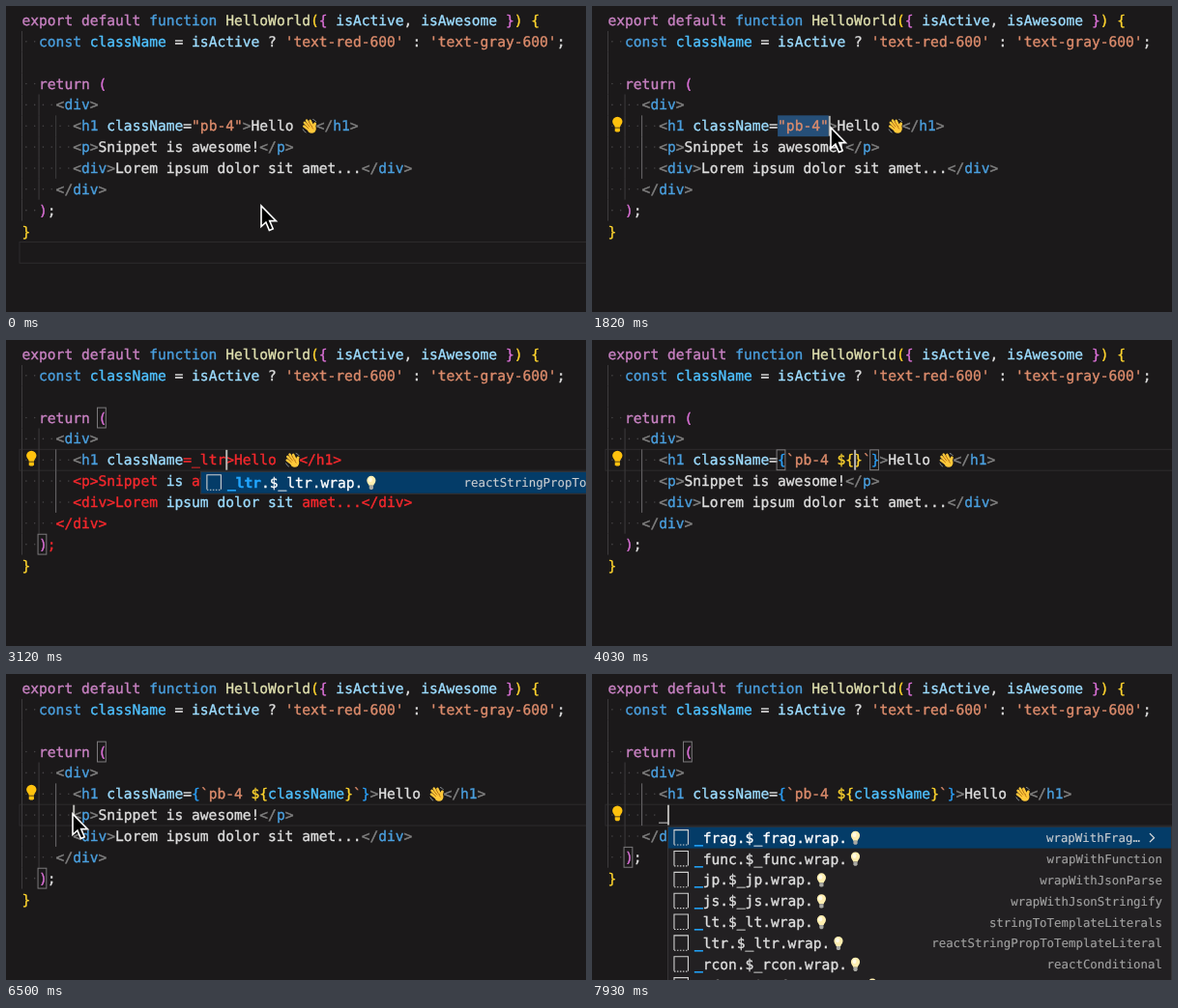
Recreate the animation shown at these times as an HTML page. Size 600 by 317 pixels, loop 8000 ms.

```html
<!DOCTYPE html>
<html lang="en">
<head>
<meta charset="utf-8">
<title>Editor snippets</title>
<style>
html, body { margin: 0; width: 100%; height: 100%; overflow: hidden; background: #1b191a; }
svg { display: block; width: 100vw; height: 100vh; }
text {
  font: 14.58px "DejaVu Sans Mono", "Liberation Mono", monospace;
  text-rendering: geometricPrecision;
  color: #dedede;
  fill: currentColor;
  stroke: currentColor;
  stroke-width: .35px;
}
.m { color: #c982c3 } .b { color: #4a9fde } .y { color: #dfdfae } .v { color: #9cdcfe }
.c { color: #4fc1ff } .s { color: #dd8c6c } .d { color: #808080 } .r { color: #f5282d }
.g { color: #ffd52e } .p { color: #da70d6 } .B { color: #2a9df4 }
.hit { color: #22a6ff; font-weight: bold }
.note { font-size: 12.4px; color: #a0a0a0; text-anchor: end; stroke-width: .15px }
.on { color: #fff }
.note.on { color: #c8ccd0 }
</style>
</head>
<body>
<svg id="stage" viewBox="0 0 600 317">
  <defs>
    <g id="wave" fill="none" stroke-linecap="round">
      <path d="M8 13L3 9.2M9 11L3.6 5.6M10.2 10L5.8 3.4M12.2 9.5L9.4 3.6" stroke="#ffc83a" stroke-width="2.5"/>
      <path d="M13 12L14.4 6.6" stroke="#ffc83a" stroke-width="2.8"/>
      <ellipse cx="11" cy="11.8" rx="4.6" ry="4.8" fill="#ffc83a"/>
      <path d="M7.6 11.4L5 9M8.8 9.8L6 6.3M10.6 9L8.2 5M12.4 12Q10.8 10.6 11.2 9.2" stroke="#b06c14" stroke-width=".9"/>
      <path d="M12.4 2.2Q14.4 2.8 15.4 4.4M2 12.6Q2.8 14.8 4.8 15.8" stroke="#8d9499" stroke-width=".9"/>
    </g>
    <g id="idea">
      <path d="M-2.4 3C-2.4 1.4-4.6.4-4.6-2.4A4.6 4.6 0 0 1 4.6-2.4C4.6.4 2.4 1.4 2.4 3Z" fill="#ffeeb0"/>
      <ellipse cx="-1" cy="-3" rx="2" ry="2.4" fill="#fffbe6"/>
      <path d="M-2.1 3H2.1V6L1 7.2H-1L-2.1 6Z" fill="#a9a9a4"/>
    </g>
    <g id="bulb" fill="#ffc20e">
      <path d="M-2.6 3.4C-2.6 1.8-5.2.2-5.2-2.4A5.2 5.2 0 0 1 5.2-2.4C5.2.2 2.6 1.8 2.6 3.4Z"/>
      <path d="M-2.6 4.2H2.6V7L1.4 8.2H-1.4L-2.6 7Z"/>
    </g>
    <g id="snip" fill="none" stroke="#d0d0d0" stroke-width="1.1">
      <path d="M0 15V0H14.5V15"/>
      <path d="M0 15.4H15" stroke-dasharray="1.5 1.5"/>
    </g>
    <g id="var" fill="none" stroke="#75beff" stroke-width="1.3">
      <path d="M2 2.5H-1.5V13.5H2M12 2.5H15.5V13.5H12"/>
      <path d="M3 7.2L8.6 4.8 11.4 6.6V9.4L6 11.4 3 9.8ZM3 7.2L6 8.8 11.4 6.6M6 8.8V11.4"/>
    </g>
  </defs>
  <g id="scene"></g>
  <path id="mouse" d="M0 0V21.5L4.9 17 8.4 25.4 12.2 23.8 8.7 15.6H15.4Z" fill="#000" stroke="#fff" stroke-width="1.6"/>
</svg>
<script>
const LOOP = 8000, STEP = 130;
const LEFT = 16.5, CHAR = 8.78, MID = 15, ROW = 21.85;
const EMOJI_COLS = 1.65;
const colX = c => LEFT + c * CHAR;
const rowY = r => MID + r * ROW;

const notes = {
  _frag: 'wrapWithFragment', _func: 'wrapWithFunction', _jp: 'wrapWithJsonParse',
  _js: 'wrapWithJsonStringify', _lt: 'stringToTemplateLiterals',
  _ltr: 'reactStringPropToTemplateLiteral', _rcon: 'reactConditional', _rfrag: 'reactFragment'
};
const snippets = Object.keys(notes).map(k => ({ label: `${k}.$${k}.wrap.`, note: notes[k] }));
const plain = names => names.split(' ').map(label => ({ label }));
const attrItems = [...plain('__dirname __filename'), ...snippets];
const nameItems = plain('className clearInterval clearTimeout close closed caches cancelIdleCallback captureEvents confirm');

const outer = last => [[3, 9, 1], [last, 2, 1]];
const literal = name => '¦B{¦s`pb-4 ¦g${¦c' + name + '¦g}¦s`¦B}';
const attr = typed => ({ value: typed, broken: true, caret: 20 + typed.length, menu: { col: 21, items: attrItems, typed } });
const expr = typed => ({
  value: literal(typed), caret: 29 + typed.length,
  marks: [[5, 20, 1], [5, 31 + typed.length, 1]], menu: { col: 30, items: nameItems, typed }
});

// Each beat changes part of the editor state from its time on.
const beats = [
  [0, { row: 11, caret: 0, value: '¦s"pb-4"', marks: [] }],
  [910, { row: 5, caret: 20, marks: outer(9) }],
  [1300, { from: [5, 20], marks: [], bulb: 5 }],
  [1950, { from: null, value: '', marks: outer(9) }],
  [2080, attr('_')],
  [2600, attr('_l')],
  [2860, attr('_lt')],
  [3120, attr('_ltr')],
  [3510, { ...expr(''), broken: false, menu: null }],
  [4290, expr('c')],
  [4420, expr('cl')],
  [4550, expr('cla')],
  [4680, { ...expr('className'), menu: null, caret: 39, marks: [[5, 27, 2], [5, 38, 1]] }],
  [6240, { row: 6, caret: 6, marks: outer(9) }],
  [6760, { from: [6, 6], marks: [] }],
  [7020, { bulb: 7 }],
  [7410, { from: null, cut: true, typed: '', bulb: 6, marks: outer(8) }],
  [7670, { typed: '_', caret: 7, menu: { col: 7, items: snippets, typed: '_' } }]
];

const moves = [
  [0, 264, 207], [780, 201, 126], [1170, 201, 126], [1690, 247, 126],
  [5590, 247, 126], [6240, 69, 145], [6630, 69, 145], [7150, 422, 170], [7280, 430, 198], [8000, 430, 198]
];

function pointer(t) {
  const i = moves.findIndex(m => m[0] > t);
  const [t0, x0, y0] = moves[i - 1], [t1, x1, y1] = moves[i];
  const k = (t - t0) / (t1 - t0), e = k * k * (3 - 2 * k);
  return { x: x0 + (x1 - x0) * e, y: y0 + (y1 - y0) * e, shown: t < 1950 || (t >= 5590 && t < 7410) };
}

function stateAt(t) {
  const past = beats.filter(b => b[0] <= t);
  return Object.assign({ since: past[past.length - 1][0] }, ...past.map(b => b[1]));
}

function codeLines(s) {
  const tag = n => `¦d<¦b${n}¦d>`, end = n => `¦d</¦b${n}¦d>`;
  const h1 = 'w      ¦d<¦bh1 ¦vclassName';
  const head = [
    'mexport default ¦bfunction ¦yHelloWorld¦g(¦p{ ¦visActive¦w, ¦visAwesome ¦p}¦g) {',
    "w  ¦bconst ¦cclassName ¦w= ¦visActive ¦w? ¦s'text-red-600' ¦w: ¦s'text-gray-600'¦w;",
    'w', 'w  ¦mreturn ¦p(', 'w    ' + tag('div')
  ];
  if (s.broken) return [...head,
    `${h1}¦r=${s.value}>Hello ¦E  ¦r</h1>`,
    'w      ¦r<p>Snippet ¦vis ¦rawesome!</p>',
    'w      ¦r<div>Lorem ¦vipsum dolor sit ¦ramet...</div>',
    'w    ¦r</div>', 'w  ¦p)¦r;', 'g}'];
  const body = s.cut ? ['w      ' + s.typed] : [
    'w      ' + tag('p') + '¦wSnippet is awesome!' + end('p'),
    'w      ' + tag('div') + '¦wLorem ipsum dolor sit amet...' + end('div')
  ];
  return [...head, `${h1}¦w=${s.value}¦d>¦wHello ¦E  ` + end('h1'), ...body, 'w    ' + end('div'), 'w  ¦p)¦w;', 'g}'];
}

const esc = s => s.replace(/&/g, '&amp;').replace(/</g, '&lt;').replace(/>/g, '&gt;');
const text = (x, y, s, cls) => `<text class="${cls}" x="${x}" y="${y + 5}">${esc(s)}</text>`;
const rect = (x, y, w, h, style) => `<rect x="${x}" y="${y}" width="${w}" height="${h}" ${style}/>`;
const use = (id, x, y) => `<use href="#${id}" x="${x}" y="${y}"/>`;
const lineText = line => line.split('¦').map(p => p.slice(1)).join('');

function drawLine(line, r) {
  let col = 0, out = '';
  const y = rowY(r), indent = lineText(line).search(/\S|$/);
  for (let c = 0; c < indent; c++) out += `<circle cx="${colX(c + .5)}" cy="${y}" r=".8" fill="#464446"/>`;
  for (const part of line.split('¦')) {
    const s = part.slice(1), word = s.trim(), emoji = part[0] === 'E';
    if (emoji) out += use('wave', colX(col) - 1, y - 9);
    else if (word) out += text(colX(col + s.search(/\S/)), y, word, part[0]);
    col += emoji ? EMOJI_COLS : s.length;
  }
  return out;
}

function drawGuides(lines, s) {
  return lines.map((line, r) => {
    const indent = line === 'w' ? 2 : lineText(line).search(/\S|$/);
    let out = '';
    for (let c = 0; c < indent; c += 2) {
      const lit = c === 4 && s.row < 8;
      out += rect(colX(c) - .5, rowY(r - .5), 1, ROW, `fill="${lit ? '#6c6a6c' : '#3d3b3d'}"`);
    }
    return out;
  }).join('');
}

function selection(s, lines, p) {
  const [r0, c0] = s.from;
  const r1 = Math.max(r0, Math.min(r0 === 5 ? 5 : 7, Math.round((p.y - MID) / ROW)));
  const c1 = Math.max(c0, Math.min(lineText(lines[r1]).length, Math.round((p.x - LEFT) / CHAR)));
  let out = '';
  for (let r = r0; r <= r1; r++) {
    const a = r === r0 ? c0 : 0, b = r === r1 ? c1 : lineText(lines[r]).length + 1;
    out += rect(colX(a), rowY(r - .5), (b - a) * CHAR, ROW, 'fill="#264f78"');
  }
  return { out, row: r1, col: c1 };
}

function drawMenu({ col, items, typed }, row) {
  const x = colX(col) + 1, top = rowY(row + .5) + 1.7;
  const list = items.filter(i => i.label.startsWith(typed));
  let out = rect(x - .5, top - .5, 521, list.length * ROW + 1, 'fill="#222022" stroke="#383638"');
  list.forEach((item, i) => {
    const y = top + (i + .5) * ROW, on = i === 0 ? 'on' : '', tx = x + 27;
    if (on) out += rect(x, top, 520, ROW, 'fill="#043c68"');
    out += use(item.note ? 'snip' : 'var', x + 6, y - 8);
    out += text(tx, y, typed, 'hit') + text(tx + typed.length * CHAR, y, item.label.slice(typed.length), on);
    if (!item.note) return;
    out += use('idea', tx + item.label.length * CHAR + 8.5, y);
    out += on
      ? text(x + 488, y - .5, item.note.slice(0, -4) + '…', 'note on') +
        `<path d="M${x + 498} ${y - 4.5}l4.5 4.5-4.5 4.5" fill="none" stroke="#ddd" stroke-width="1.3"/>`
      : text(x + 511, y - .5, item.note, 'note');
  });
  return out;
}

function draw(t) {
  const s = stateAt(t), p = pointer(t), lines = codeLines(s);
  let { row, caret } = s, out = '';
  if (s.from) {
    const sel = selection(s, lines, p);
    out += sel.out;
    row = sel.row;
    caret = sel.col;
  } else {
    out += rect(14, rowY(row - .5), 590, ROW, 'fill="none" stroke="#2d2b2d"');
  }
  out += drawGuides(lines, s) + lines.map(drawLine).join('');
  for (const [r, c, n] of s.marks)
    out += rect(colX(c) - 1, rowY(r - .5) + .5, n * CHAR, ROW - 1, 'fill="none" stroke="#7c7a7c"');
  if (s.bulb) out += use('bulb', 26.3, rowY(s.bulb) - 2);
  if (row < 11 && (t - s.since) % 1040 < 530)
    out += rect(colX(caret), rowY(row - .5) + .5, 2, ROW - 1, 'fill="#b6b5b2"');
  if (s.menu) out += drawMenu(s.menu, row);
  scene.innerHTML = out;
  mouse.setAttribute('transform', `translate(${p.x} ${p.y})`);
  mouse.setAttribute('visibility', p.shown ? 'visible' : 'hidden');
}

const scene = document.getElementById('scene'), mouse = document.getElementById('mouse');
let shown = -1;
function tick() {
  const step = Math.floor(performance.now() % LOOP / STEP);
  if (step !== shown) draw((shown = step) * STEP);
  requestAnimationFrame(tick);
}
tick();
</script>
</body>
</html>
```
